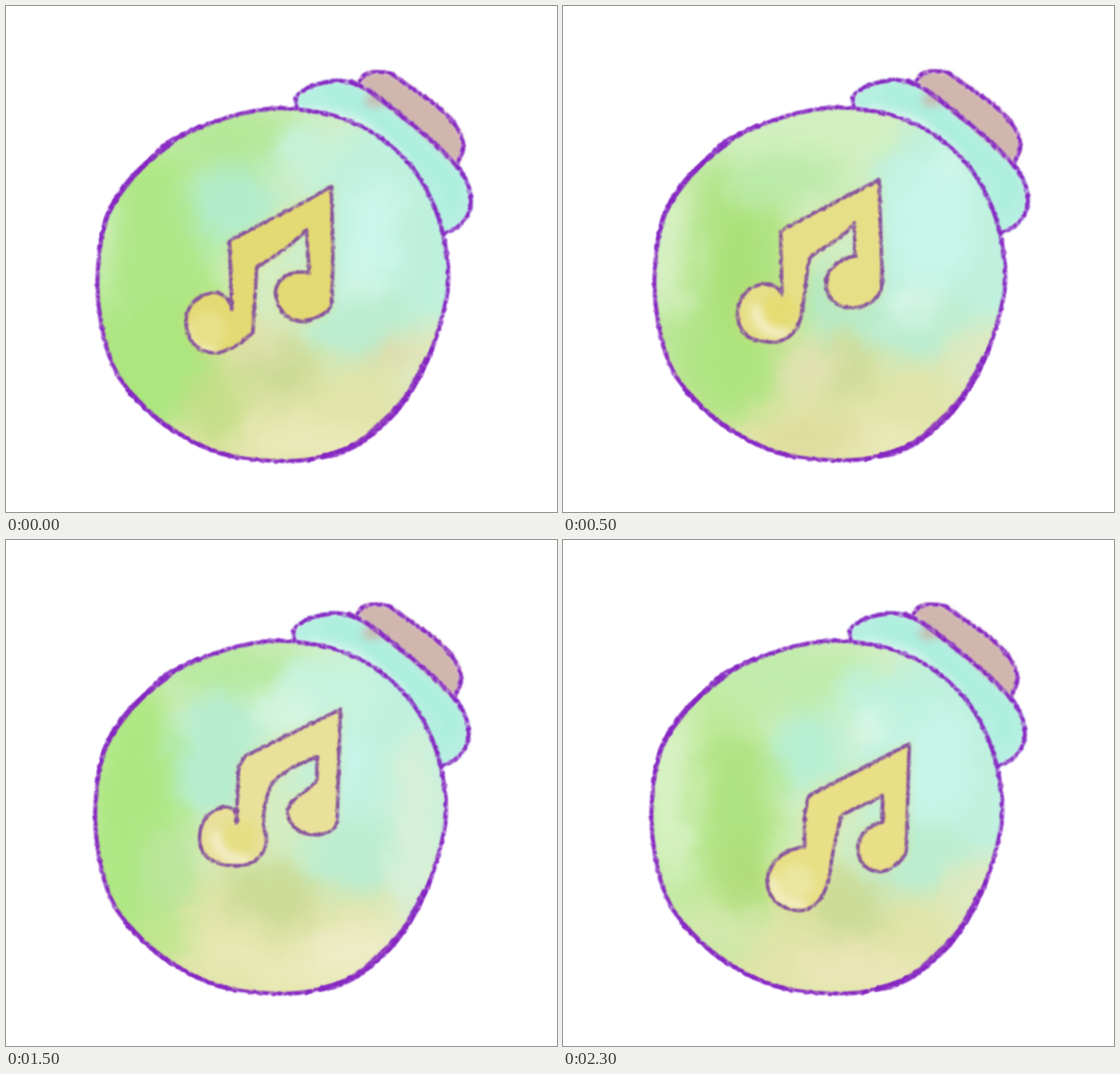
Recreate the animation shown at these times as an HTML page. Size 732 px wide and 672 px high, loop 2500 ms.

```html
<!DOCTYPE html>
<html lang="en">
<head>
<meta charset="utf-8">
<title>Music bottle</title>
<style>
  html, body { margin: 0; width: 100%; height: 100%; overflow: hidden; background: #fff; }
  svg { display: block; width: 732px; height: 672px; }
  .ink { fill: none; stroke: #8526c2; stroke-width: 5.4; stroke-linecap: round; stroke-linejoin: round; filter: url(#crayon); }
  .note .ink { stroke: #85509c; stroke-width: 4.8; }
</style>
</head>
<body>
<svg id="stage" viewBox="0 0 732 672">
  <defs>
    <filter id="crayon" filterUnits="userSpaceOnUse" x="0" y="0" width="732" height="672" color-interpolation-filters="sRGB">
      <feTurbulence type="fractalNoise" baseFrequency=".16" numOctaves="2" seed="4" result="noise"/>
      <feDisplacementMap in="SourceGraphic" in2="noise" scale="3.5" xChannelSelector="R" yChannelSelector="G" result="rough"/>
      <feColorMatrix in="noise" values="0 0 0 0 0  0 0 0 0 0  0 0 0 0 0  0 0 1.8 0 .05" result="grain"/>
      <feComposite in="rough" in2="grain" operator="in"/>
      <feGaussianBlur stdDeviation=".8"/>
    </filter>
    <filter id="wash" filterUnits="userSpaceOnUse" x="0" y="0" width="732" height="672" color-interpolation-filters="sRGB">
      <feGaussianBlur stdDeviation="17" result="soft"/>
      <feTurbulence type="fractalNoise" baseFrequency=".022" numOctaves="3" seed="9"/>
      <feDisplacementMap in="soft" scale="30" xChannelSelector="R" yChannelSelector="G"/>
    </filter>
    <filter id="soft" filterUnits="userSpaceOnUse" x="0" y="0" width="732" height="672" color-interpolation-filters="sRGB">
      <feGaussianBlur stdDeviation="6"/>
    </filter>
    <filter id="bleed" filterUnits="userSpaceOnUse" x="0" y="0" width="732" height="672" color-interpolation-filters="sRGB">
      <feGaussianBlur stdDeviation="3"/>
    </filter>
  </defs>
</svg>
<script>
const HOLD = 500;

// Smooth curve through "x,y x,y ..." points.
function curve(text, closed) {
  const p = text.split(' ').map(s => s.split(',').map(Number)), n = p.length;
  const at = i => closed ? p[(i + n) % n] : p[Math.max(0, Math.min(n - 1, i))];
  let d = 'M' + p[0];
  for (let i = 0; i < (closed ? n : n - 1); i++) {
    const [a, b, c, e] = [at(i - 1), at(i), at(i + 1), at(i + 2)];
    const h1 = b.map((v, k) => v + (c[k] - a[k]) / 6);
    const h2 = c.map((v, k) => v - (e[k] - b[k]) / 6);
    d += `C${h1} ${h2} ${c}`;
  }
  return d + (closed ? 'Z' : '');
}

const body = curve('385,137 345,137 285,151 218,182 167,230 134,282 122,350 125,412 141,475 171,519 222,563 288,595 355,604 410,601 468,580 520,537 560,470 580,410 588,362 581,305 565,257 536,210 490,170 440,147', true);
const neck = 'M386,134C378,114 406,103 440,99C475,100 503,127 530,149C560,174 592,200 606,222C628,258 619,292 577,304';
const seam = 'M458,100C478,106 505,131 530,150C558,171 582,194 599,213';
const cork = 'M470,99C476,87 490,85 512,90C530,102 545,114 562,125C588,143 611,169 607,192L599,211';

const heavy = [
  '258,159 217,179 191,203 157,237 133,280 125,318',
  '220,184 190,207 160,236 140,268',
  '398,603 437,597 473,580 510,547 546,500 565,457',
  '415,598 455,586 491,559 530,518 557,468',
  '160,510 205,553 262,585 300,597'
].map(s => curve(s));

// Washes: "x y rx ry colour"
const common = [
  '350 545 260 105 #e0e4a8', '520 300 130 150 #bff1de', '365 480 50 45 #ccda96',
  '475 425 80 50 #bbedd0', '550 480 40 60 #dfe9c0', '400 580 85 25 #ebeaba'
];

const poses = [
  { shift: [0, 0], fill: '#e4da74', glow: '#e8e08a', spot: [268, 430],
    note: 'M432,240C390,266 340,288 297,312L300,403C296,387 284,377 270,382C246,387 236,408 240,428C244,452 262,463 284,460C304,455 320,442 328,432L333,347C355,334 382,316 399,297L403,355C380,348 358,362 358,382C360,406 378,421 397,419C412,415 429,407 432,398C436,350 434,290 432,240Z',
    washes: ['190 380 95 190 #afe786', '320 180 110 50 #b5e798', '130 300 16 100 #cdeeb8', '300 265 60 55 #b0ecca',
      '400 195 50 40 #c8f1d7', '490 300 40 75 #cdf6ea', '545 320 25 70 #bdf0da', '465 375 20 15 #e1f8ee',
      '330 440 50 25 #dee0ab', '275 525 40 60 #c5de88', '200 470 60 80 #abe67e', '515 465 35 20 #dedaa8'] },
  { shift: [0, -1], fill: '#e7df88', glow: '#e6dc74', spot: [288, 405],
    note: 'M420,231C374,254 330,276 289,299L291,384C285,371 276,367 262,370C238,376 227,400 234,422C240,441 258,448 285,446C307,440 316,424 318,400C324,375 322,355 328,334C348,318 370,311 387,288L388,332C362,336 346,355 350,375C355,396 372,403 392,400C414,396 425,382 424,362Z',
    washes: ['220 380 100 180 #b2e488', '310 170 130 45 #d1f0bf', '145 300 28 120 #d5f0c1', '290 230 85 35 #bceaa8',
      '235 360 35 90 #abe076', '365 390 55 45 #b5e9c6', '490 290 55 85 #c9f6eb', '465 397 35 16 #e4f8f1',
      '520 205 12 14 #f2fcf7', '325 480 45 35 #e0e2b0', '230 485 45 55 #aee47d', '330 575 70 22 #dfdb9b'] },
  { shift: [-4, -3], fill: '#e8e092', glow: '#e6de84', spot: [325, 420],
    note: 'M458,247C432,265 403,269 388,280C370,292 345,298 329,315L328,393C325,380 315,374 305,377C283,383 272,402 278,425C283,449 305,459 328,455C353,450 367,430 366,405C365,376 367,350 378,342C395,330 420,325 428,312L432,338C418,355 393,362 392,390C394,409 412,417 430,414C445,411 455,399 460,388Z',
    washes: ['180 380 75 200 #aee680', '270 195 90 55 #b5e78f', '395 180 70 45 #d1f3dc', '285 325 58 85 #b2ecd2',
      '375 255 35 35 #daf5e6', '555 330 28 120 #d6f3df', '480 310 25 55 #c7f4e7', '245 455 45 65 #bfe6a4',
      '515 530 55 60 #edecc9', '325 570 65 25 #e0da9a', '180 400 40 70 #ade177', '350 490 42 35 #c9d891'] },
  { shift: [-3, -2], fill: '#e9e19a', glow: '#e6de84', spot: [310, 395],
    note: 'M444,225L318,287L309,301L306,376C310,362 300,353 288,355C266,360 254,380 258,405C262,425 285,435 315,432C336,428 347,412 346,395C338,372 344,345 352,326C361,312 370,310 380,302L413,288L413,320C400,335 373,345 374,362C376,383 395,394 418,391C432,388 441,381 440,372Z',
    washes: ['175 380 68 190 #aee782', '310 175 110 40 #b9e9a0', '285 290 60 90 #b6edd0', '435 205 75 50 #c6f3df',
      '375 230 45 30 #d4f5e2', '548 385 38 135 #d7f0d8', '460 305 25 55 #c7f4e8', '220 440 40 55 #bae59a',
      '300 545 60 35 #e7e8b2', '470 545 70 40 #edecc6', '345 462 55 40 #cbdb96', '205 530 50 35 #bfe68f'] },
  { shift: [-4, -2], fill: '#e8df86', glow: '#ebe6a0', spot: [310, 455],
    note: 'M460,271L326,340L321,365L321,408C295,410 275,425 271,452C272,479 292,493 318,492C339,488 350,470 355,440C358,410 365,385 370,366C388,354 408,351 424,339L425,374C405,378 389,395 392,415C395,433 408,442 425,440C440,436 450,425 456,416Z',
    washes: ['200 380 100 200 #c0ea9e', '310 185 115 50 #c1ebaa', '145 320 28 140 #d8f2c6', '235 360 45 105 #afe280',
      '330 285 45 55 #b5efd3', '430 215 65 40 #bdf2de', '410 250 28 28 #daf6e9', '500 300 50 80 #c7f5e9',
      '205 520 65 40 #d1e8aa', '245 450 38 45 #b0dd79', '385 495 50 40 #cbdb97', '385 565 75 25 #ebe5b6'] }
];

const ellipse = wash => {
  const [x, y, rx, ry, fill] = wash.split(' ');
  return `<ellipse cx="${x}" cy="${y}" rx="${rx}" ry="${ry}" fill="${fill}"/>`;
};

const bottle = (p, i) => `
  <clipPath id="glass${i}"><path d="${body}"/></clipPath>
  <clipPath id="note${i}"><path d="${p.note}"/></clipPath>
  <g transform="translate(${p.shift})">
    <path d="${neck}L490,170L440,147Z" fill="#b5f0e1" filter="url(#bleed)"/>
    <path d="M425,116C470,113 520,172 595,238L585,270" fill="none" stroke="#aceedd" stroke-width="20" filter="url(#soft)"/>
    <path d="M405,138L470,156L530,205" fill="none" stroke="#e3f8f1" stroke-width="10" filter="url(#soft)"/>
    <path d="${cork}L530,150L470,104Z" fill="#d0b6ad" filter="url(#bleed)"/>
    <ellipse cx="490" cy="126" rx="13" ry="8" fill="#ccb6ad" filter="url(#soft)"/>
    <path class="ink" d="${neck}${seam}${cork}"/>
    <g clip-path="url(#glass${i})">
      <path d="${body}" fill="#d4eec4"/>
      <g filter="url(#wash)">${[...common, ...p.washes].map(ellipse).join('')}</g>
    </g>
    <path class="ink" d="${body}"/>
    <path class="ink" d="${heavy.join('')}" style="stroke-width:3.8"/>
  </g>
  <g class="note">
    <path d="${p.note}" fill="none" stroke="${p.fill}" stroke-width="8" opacity=".35" filter="url(#soft)"/>
    <path d="${p.note}" fill="${p.fill}"/>
    <g clip-path="url(#note${i})">
      <circle cx="${p.spot[0]}" cy="${p.spot[1]}" r="24" fill="${p.glow}" filter="url(#soft)"/>
      <path d="M${p.spot[0] - 32},${p.spot[1] - 8}q0,40 44,38" fill="none" stroke="#f5f1d0" stroke-width="11" filter="url(#soft)"/>
    </g>
    <path class="ink" d="${p.note}"/>
  </g>`;

const stage = document.getElementById('stage');
const groups = poses.map((pose, i) => {
  const g = document.createElementNS('http://www.w3.org/2000/svg', 'g');
  g.innerHTML = bottle(pose, i);
  stage.append(g);
  return g;
});

let shown = -1;
function draw() {
  const now = Math.floor(performance.now() / HOLD) % poses.length;
  if (now !== shown) {
    groups.forEach((g, i) => g.style.display = i === now ? '' : 'none');
    shown = now;
  }
  requestAnimationFrame(draw);
}
draw();
</script>
</body>
</html>
```
